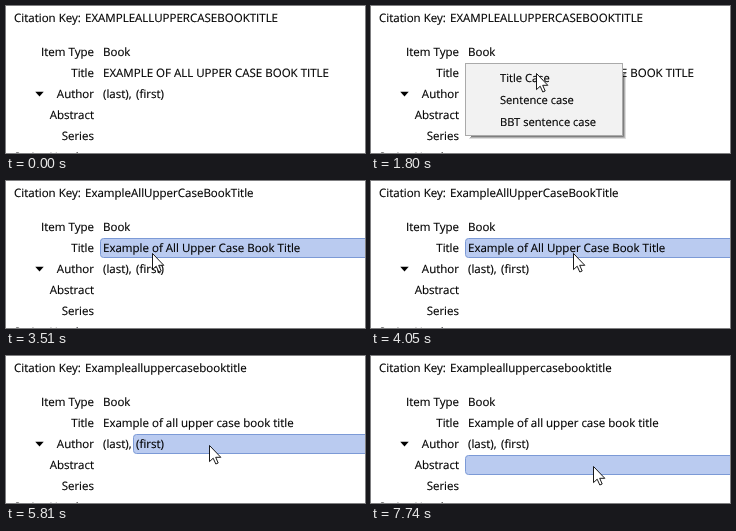
An HTML page for the animation above (8000 ms loop, 359 by 147 pixels).

```html
<!DOCTYPE html>
<html lang="en">
<head>
<meta charset="utf-8">
<title>Title case menu</title>
<style>
html, body { margin: 0; width: 100%; height: 100%; overflow: hidden; background: #fff; }
svg { display: block; width: 359px; height: 147px; }
text {
  font: 11.53px "Open Sans", "Noto Sans", sans-serif;
  fill: #000; stroke: #000; stroke-width: .15px;
  text-rendering: geometricPrecision; white-space: pre;
}
.label { text-anchor: end; }
#menu text { font-size: 11.15px; }
</style>
</head>
<body>
<svg viewBox="0 0 359 147">
  <rect width="359" height="147" fill="#fff"/>
  <rect id="hover" width="300" height="19" rx="3" fill="#bacbf0" stroke="#7c9ad6"/>
  <text x="8" y="16">Citation Key:</text>
  <text id="key" x="79" y="16"></text>
  <g id="labels"></g>
  <path d="M29.3 85.8h8.4l-4.2 4.7z"/>
  <text x="97" y="50">Book</text>
  <text id="title" x="97" y="71"></text>
  <text x="97" y="92">(last),</text>
  <text x="130" y="92">(first)</text>
  <g id="shadow" fill="none" stroke="#000"></g>
  <g id="menu">
    <rect x="94.5" y="57.5" width="157" height="72" fill="#f2f2f2" stroke="#aaa"/>
    <rect id="pick" x="97" width="152" height="22" fill="#91c9f7"/>
  </g>
  <path id="cursor" d="M.5 .5V16.6L4.2 13.2 6.8 19 9.2 18 6.7 12.3H11.8Z" fill="#fff" stroke="#000" stroke-width=".9"/>
</svg>
<script>
const LOOP = 8000, STEP = 67, FADE = 70, KEY_DELAY = 400;
const $ = id => document.getElementById(id);
const add = (parent, tag, attrs, text = '') => {
  const el = document.createElementNS('http://www.w3.org/2000/svg', tag);
  for (const k in attrs) el.setAttribute(k, attrs[k]);
  el.textContent = text;
  parent.append(el);
};
const show = (id, on) => $(id).setAttribute('visibility', on ? 'visible' : 'hidden');

['Item Type', 'Title', 'Author', 'Abstract', 'Series', 'Series Number'].forEach((s, i) =>
  add($('labels'), 'text', { class: 'label', x: 88, y: 50 + 21 * i }, s));
['Title Case', 'Sentence case', 'BBT sentence case'].forEach((s, i) =>
  add($('menu'), 'text', { x: 129, y: 76 + 22 * i }, s));
[.5, .3, .13].forEach((a, i) =>
  add($('shadow'), 'path', { d: `M${252.5 + i} ${68 - i}V${130.5 + i}H${100 - i}`, 'stroke-opacity': a }));

// The title in each case, and the citation key made from it
const titles = [
  'EXAMPLE OF ALL UPPER CASE BOOK TITLE',
  'Example of All Upper Case Book Title',
  'Example of all upper case book title'
];
const keyOf = title => title.replace(/ of /i, '').replaceAll(' ', '');

const menus = [
  { open: 1670, pick: 3080 },
  { open: 4660, pick: 5400 },
  { open: 6720, pick: 7320 }
];

// Pointer moves: start, end, x, y
const moves = [
  [330, 330, 222, 141], [330, 810, 190, 79], [810, 1200, 165, 67],
  [2530, 3010, 139, 72], [3440, 4050, 202, 72], [4050, 4190, 237, 71],
  [4320, 4520, 256, 71], [4660, 5130, 228, 100], [5400, 6720, 143, 62],
  [6720, 7050, 173, 115], [7320, 7740, 222, 110]
];

// Position within a move, advancing in whole steps
function pointer(i, t) {
  if (i < 1) return moves[0].slice(2);
  const [start, end, x, y] = moves[i], [, , x0, y0] = moves[i - 1];
  const n = Math.round((end - start) / STEP);
  const f = Math.min(1, Math.floor((t - start + 5) / (end - start) * n) / n);
  return [Math.round(x0 + (x - x0) * f), Math.round(y0 + (y - y0) * f)];
}

function draw(t) {
  const i = moves.findLastIndex(m => m[0] <= t);
  const moved = i < 0 ? -1 : moves[i][0];
  const [x, y] = pointer(i, t);

  const picks = time => menus.filter(m => m.pick <= time).length;
  const titleAt = time => titles[Math.min(picks(time), 2)];
  $('title').textContent = titleAt(t - FADE);
  $('key').textContent = keyOf(titleAt(t - KEY_DELAY));

  const menu = menus.find(m => m.open <= t && t < m.pick);
  const open = menu && t >= menu.open + FADE;
  const lastPick = picks(t) ? menus[picks(t) - 1].pick : 0;

  const row = Math.floor((y - 57) / 21);
  show('hover', !menu && moved >= lastPick && row >= 0);
  $('hover').setAttribute('x', row === 1 ? 127.5 : 94.5);
  $('hover').setAttribute('y', 57.5 + 21 * row);

  show('shadow', menu);
  show('menu', open);
  const item = Math.floor((y - 60) / 22);
  show('pick', open && moved >= menu.open && x < 251 && item >= 0 && item < 3);
  $('pick').setAttribute('y', 60 + 22 * item);

  show('cursor', i >= 0);
  $('cursor').setAttribute('transform', `translate(${x} ${y})`);
}

function tick() {
  draw(performance.now() % LOOP);
  requestAnimationFrame(tick);
}
tick();
</script>
</body>
</html>
```
